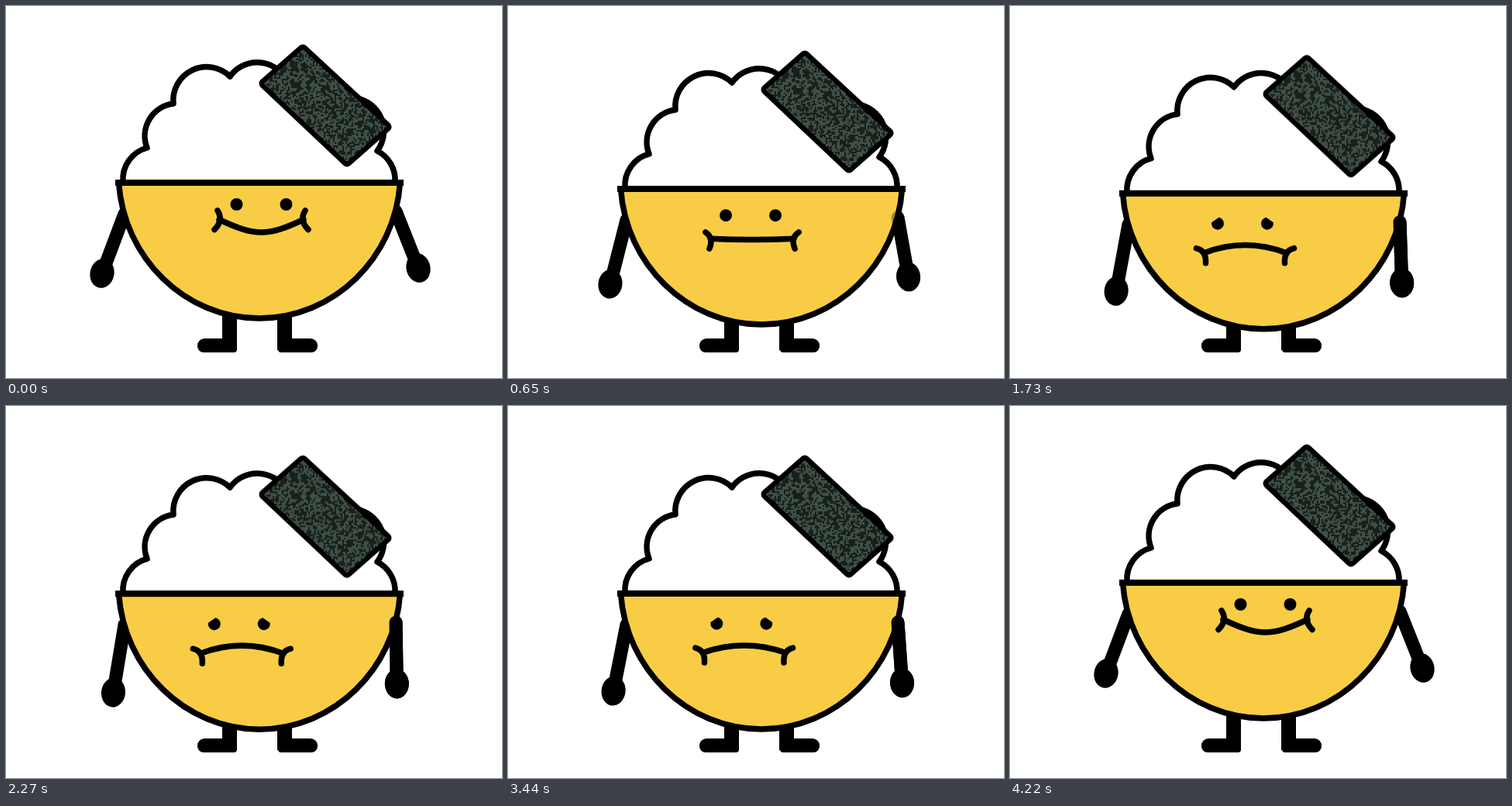
These frames come from a looping animation (640 px wide and 480 px high, 4550 ms). An HTML page with a canvas:

```html
<!DOCTYPE html>
<html lang="en">
<head>
<meta charset="utf-8">
<title>Rice bowl</title>
<style>
  html, body { margin: 0; width: 100%; height: 100%; overflow: hidden; background: #fff; }
  canvas { display: block; }
</style>
</head>
<body>
<canvas id="stage" width="640" height="480"></canvas>
<script>
const LOOP = 4550;
const YELLOW = '#f8cd45';
const g = document.getElementById('stage').getContext('2d');

const rice = new Path2D(`M151 227 A42 42 0 0 1 182 183 A42 42 0 0 1 216 126
  A43 43 0 0 1 289 91 A43 43 0 0 1 360 92 L452 119
  A43 43 0 0 1 479 187 A42 42 0 0 1 502 227`);
const bowl = new Path2D('M145.5 228 C152 325 231 403 327 403 S502 325 508.5 228 Z');
const rim = new Path2D('M141 228 H513');
const sheet = new Path2D('M383 56 L333 100 L440 201 L491 156 Z');

const clamp = v => Math.max(0, Math.min(1, v));
const ease = (t, a, b) => (1 - Math.cos(Math.PI * clamp((t - a) / (b - a)))) / 2;
const mix = (a, b, k) => a + (b - a) * k;

function outline(path, fill) {
  g.lineWidth = 7.5;
  g.fillStyle = fill;
  g.fill(path);
  g.stroke(path);
}

// The speckled sheet never changes, so it is drawn once
function makeNori() {
  const layer = document.createElement('canvas');
  layer.width = 640;
  layer.height = 480;
  const c = layer.getContext('2d');
  let seed = 7;
  const rnd = n => (seed = seed * 16807 % 2147483647) % n;
  c.lineWidth = 13;
  c.lineJoin = 'round';
  c.stroke(sheet);
  c.clip(sheet);
  c.fillStyle = '#18201c';
  c.fillRect(320, 40, 180, 180);
  c.fillStyle = '#3f4f45';
  for (let i = 0; i < 2400; i++) {
    const flat = rnd(2);
    c.fillRect(328 + 2 * rnd(84), 50 + 2 * rnd(78), flat ? 4 : 2, flat ? 2 : 4);
  }
  return layer;
}
const nori = makeNori();

function legs() {
  g.fillStyle = '#000';
  for (const [leg, foot] of [[279, 247], [350, 351]]) {
    g.fillRect(leg, 390, 19, 54);
    g.beginPath();
    g.roundRect(foot, 429, 51, 18, foot < leg ? [9, 4, 4, 8] : [4, 9, 8, 4]);
    g.fill();
  }
}

function arm(x, y, hx, hy) {
  g.lineWidth = 17;
  g.beginPath();
  g.moveTo(x, y);
  g.lineTo(hx, hy);
  g.stroke();
  g.fillStyle = '#000';
  g.beginPath();
  g.ellipse(hx, hy, 15.5, 19, 0.6 * Math.atan2(x - hx, hy - y), 0, 7);
  g.fill();
}

// k runs from happy (0) to sad (1)
function face(k) {
  const eyeX = mix(329.5, 300.5, k), eyeY = mix(256, 267, k);
  const x = mix(329.5, 304, k), half = mix(54.5, 53, k);
  const end = mix(275.5, 305, k), bend = mix(297.5, 291.7, k), spread = mix(8, 18, k);
  // Sad eyes lose a slice on their upper outer side
  const cut = 0.8 * clamp((k - 0.6) / 0.4);

  g.lineWidth = 7.5;
  g.fillStyle = '#000';
  g.beginPath();
  g.moveTo(x - half, end);
  g.bezierCurveTo(x - spread, bend, x + spread, bend, x + half, end);
  g.stroke();

  for (const side of [-1, 1]) {
    const a = -Math.PI / 2 + side * 0.6;
    g.beginPath();
    g.arc(eyeX + side * 32, eyeY, 8, a + cut, a - cut + 2 * Math.PI);
    g.fill();

    const out = d => x + side * (half + d);
    g.beginPath();
    g.moveTo(out(mix(2, 10, k)), end + mix(-11.5, -6, k));
    g.quadraticCurveTo(out(mix(-6, -3, k)), end + mix(1, -3, k),
      out(mix(6, -2, k)), end + 13);
    g.stroke();
  }
}

function draw(t) {
  const down = ease(t, 200, 1030);
  const sink = down - ease(t, 3630, 4210);
  const mood = down - ease(t, 3350, 4200);
  const droop = down - ease(t, 3200, 4200);
  const sway = Math.sin(2 * Math.PI * clamp((t - 1000) / 2200));

  g.fillStyle = '#fff';
  g.fillRect(0, 0, 640, 480);
  g.strokeStyle = '#000';
  g.lineCap = g.lineJoin = 'round';
  legs();

  g.save();
  g.translate(0, 14 * sink - 0.4 * sway);
  const rightArm = () => arm(503, 265,
    mix(532, 504.8, droop) + sway, mix(338, 344, droop) - 0.5 * sway);
  arm(153, 268, mix(124, 138, droop) - sway, mix(345, 355, droop) - sway);
  rightArm();

  outline(rice, '#fff');
  g.drawImage(nori, 0, 0);
  outline(bowl, YELLOW);
  g.lineCap = 'butt';
  g.lineWidth = 8;
  g.stroke(rim);
  g.lineCap = 'round';

  // The drooping arm fades in over the bowl
  g.globalAlpha = mood * mood;
  rightArm();
  g.globalAlpha = 1;
  g.translate(-0.6 * sway, 0);
  face(mood);
  g.restore();
}

const start = performance.now();
function tick() {
  draw((performance.now() - start) % LOOP);
  requestAnimationFrame(tick);
}
tick();
</script>
</body>
</html>
```
